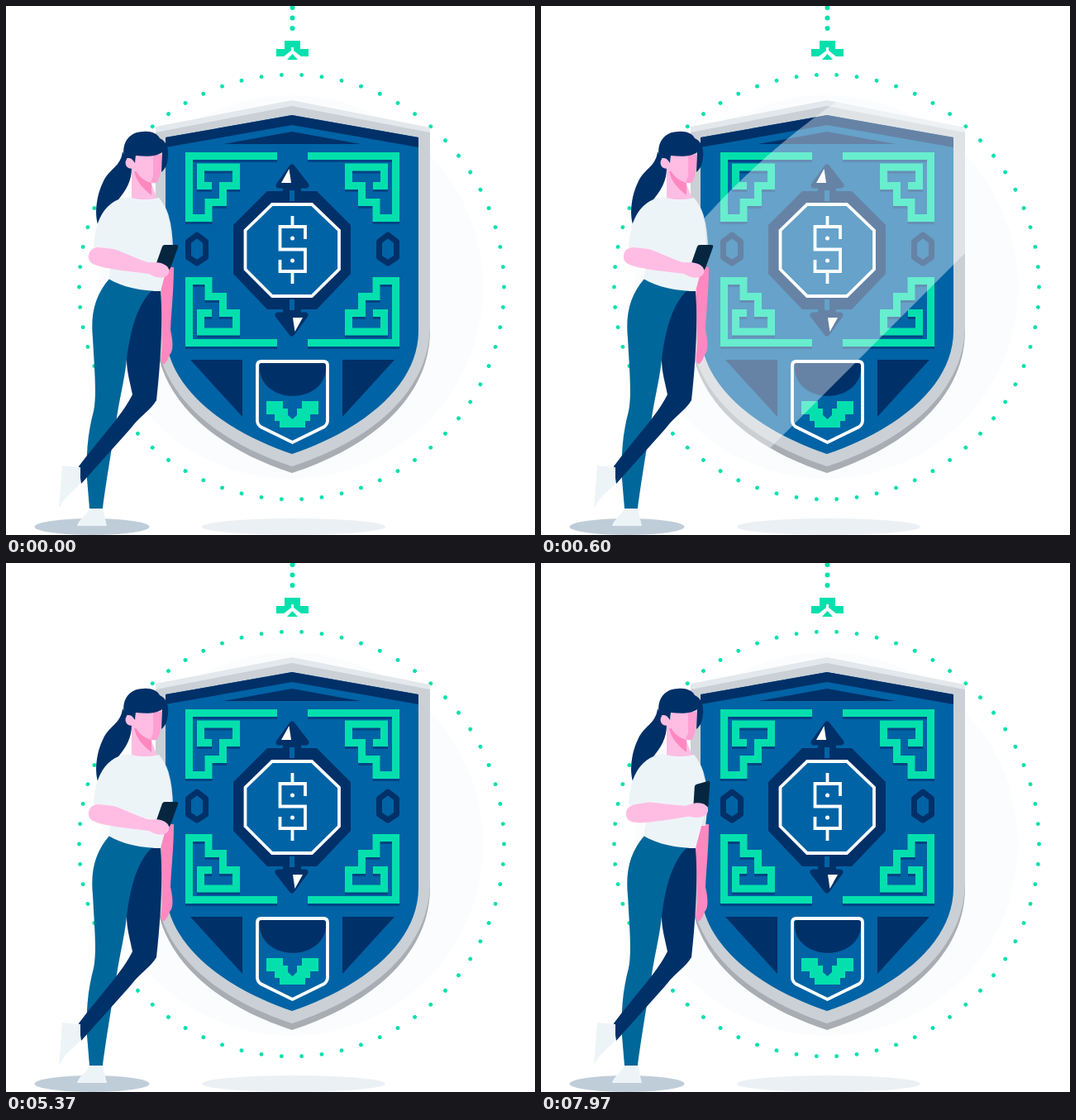
Animation, 640 px wide and 640 px high, one loop 8000 ms. Source, as an HTML page:

```html
<!DOCTYPE html>
<html lang="en">
<head>
<meta charset="utf-8">
<title>Shield</title>
<style>
  html, body { margin: 0; height: 100%; overflow: hidden; background: #fff; }
  svg { display: block; width: 100vw; height: 100vh; }
  .blue { fill: #0063a5; }
  .navy { fill: #003068; }
  .green { fill: #04e0ad; }
  .pale { fill: #edf4f8; }
  .pink { fill: #ffbde3; }
  .rose { fill: #ff88c1; }
  .line { fill: none; stroke: #fff; stroke-width: 3.8; }
</style>
</head>
<body>
<svg viewBox="0 0 640 640">
  <defs>
    <clipPath id="shield">
      <path d="M346 114L513 147V393C513 473 442 534 346 565C250 534 181 473 181 393V146Z"/>
    </clipPath>
    <path id="key" d="M328 181.5H221.5V256.5H245V237.500H262.500V217.500H278.500V195H235.500V217.500H249" fill="none" stroke-width="9"/>
    <g id="keys">
      <use href="#key"/>
      <use href="#key" transform="matrix(1 0 0 -1 0 589)"/>
    </g>
    <g id="side">
      <use href="#keys" y="3" stroke="#004584"/>
      <use href="#keys" stroke="#04e0ad"/>
      <path d="M231 277L241.5 285V304L231 311L220.5 304V285Z" class="blue" stroke="#003068" stroke-width="7" stroke-linejoin="round"/>
      <path d="M223 428H286V497Z" class="navy"/>
    </g>
    <g id="pointer">
      <path d="M346 195L363 217H330Z" class="navy" stroke="#003068" stroke-width="7" stroke-linejoin="round"/>
      <path d="M335 218H357V230H335Z" class="navy"/>
      <path d="M343 223H349V236H343Z" class="blue"/>
      <path d="M342.500 197L333 214H345Z" fill="#fff"/>
    </g>
  </defs>

  <circle cx="345" cy="340" r="232" fill="#fbfcfe"/>
  <circle cx="345.500" cy="340" r="257" fill="none" stroke="#04e0ad" stroke-width="4.800"
          stroke-linecap="round" pathLength="660" stroke-dasharray=".01 9.990"/>
  <g class="green">
    <circle cx="346.500" cy="2" r="3"/>
    <circle cx="346.500" cy="14.500" r="3"/>
    <circle cx="346.500" cy="27" r="3"/>
    <path d="M327 52H337V42H356V52H366V61H357L348 54V50H345V54L336 61H327ZM340 65L346.500 58L353 65Z"/>
  </g>
  <ellipse cx="104" cy="630" rx="69.500" ry="10" fill="#bfcdd9"/>
  <ellipse cx="348" cy="630" rx="111" ry="10" fill="#ebf0f4"/>

  <g clip-path="url(#shield)">
    <path d="M181 100H513V400H181Z" fill="#e3e8ec"/>
    <path d="M181 380H513V570H181Z" fill="#a9adb3"/>
    <path d="M346 121L513 153V386C513 466 442 526 346 557C250 526 181 466 181 386V153Z" fill="#cad0d5"/>
    <path d="M346 132L499 159V393C499 458 434 512 346 542C258 512 193 458 193 393V159Z" class="blue"/>
    <path d="M346 132L499 159V171L346 144L193 171V159ZM346 152L429 167H263Z" class="navy"/>

    <use href="#side"/>
    <use href="#side" transform="matrix(-1 0 0 1 693 0)"/>
    <path d="M316 224H376L417 265V324L376 367H316L275 324V265Z" class="navy"/>
    <use href="#pointer"/>
    <use href="#pointer" transform="rotate(180 346 295.500)"/>
    <path d="M322 240H370L403 271.500V318.500L370 351H322L289.500 318.500V271.500Z" class="line" style="fill:#0063a5"/>
    <path d="M362 282V267H331.500V294.500H362V321H331.500V307M346.500 254V267M346.500 321V336" class="line"/>
    <g fill="#fff"><circle cx="346.500" cy="281" r="2.500"/><circle cx="346.500" cy="308" r="2.500"/></g>

    <path d="M307 432H387V441C382 482 312 482 307 441Z" class="navy"/>
    <path d="M309 430H384Q389 430 389 435V501Q389 506 385 509L346.500 528L308 509Q304 506 304 501V435Q304 430 309 430Z" class="line"/>
    <path d="M315 478H335V487H341V495L346.500 500L352 495V487H358V478H378V494H368V502H362V510H331V502H325V494H315Z" class="green"/>

    <path id="glare" d="M957 50A920 920 0 0 0 59 948Z" fill="#fff" opacity=".4"/>
  </g>

  <g id="woman">
    <path d="M187 316H203C203 342 200 370 199 392C202 405 203 417 198 422C195 430 192 434 190 433C186 430 188 420 189 410Z" class="rose"/>
    <path d="M141 176C139 195 124 197 117 214C109 230 106 256 113 269L133 238C146 222 152 212 152 196Z" class="navy"/>

    <path d="M125 330C108 350 102 372 105 402C107 440 110 470 106 490C98 520 97 545 98 572L101 608H117C119 590 127 540 133 505C136 480 143 455 146 428L180 343Z" fill="#00679a"/>
    <path d="M176 345H187C190 380 187 432 182 477C175 489 164 494 150 512L91 578L88 557C110 527 141 495 153 470C150 455 146 442 146 428C150 395 158 362 176 345Z" class="navy"/>
    <path d="M68 556L90 558V577C83 587 74 589 64 608Z" class="pale"/>
    <path d="M101 608H117L122 629H86C88 621 96 618 101 608Z" class="pale"/>

    <path d="M152 195H176V215L183 234H152Z" class="pink"/>
    <path d="M155 200H176V229C165 220 158 213 155 200Z" class="rose"/>
    <path d="M185 232C198 246 201 268 202 292L199 318H180Z" fill="#e2ebf1"/>
    <path d="M148 231C164 236 176 234 185 232C198 249 200 270 199 300L187 345C165 345 140 340 124 330L130 299L106 292C107 260 120 234 148 231Z" class="pale"/>

    <path d="M157 178H188C189 192 187 207 183 213C178 216 170 213 163 207C158 202 157 199 156 196C148 199 143 193 145 187C148 182 153 184 157 188Z" class="pink"/>
    <path d="M178 180H188C189 192 187 207 183 213C180 215 177 214 175 213L178 206Z" fill="#ff9fd2"/>
    <path d="M144 186C138 168 148 152 166 152C175 151 183 154 186 160C195 164 197 174 196 183C195 193 192 198 188 201L189 177C180 183 169 182 157 181L156 190C152 183 147 183 144 186Z" class="navy"/>

    <g id="forearm">
      <path d="M192 289H206Q209 289 208 292L199 317Q198 320 195 319L184 315Q181 314 182 311L189 291Q190 289 192 289Z" fill="#06263f"/>
      <path d="M112 292C101 292 98 302 101 308C105 315 122 317 140 320L173 324C182 330 192 330 196 325C199 320 197 315 190 312C183 309 177 311 171 310C156 305 140 297 130 294Z" class="pink"/>
    </g>
  </g>
</svg>
<script>
  const LOOP = 8000, LIFT_START = 5.37;
  const glare = document.getElementById('glare');
  const forearm = document.getElementById('forearm');

  function draw(now) {
    const ms = now % LOOP;
    const sweep = -0.485 * (ms - 400);
    glare.setAttribute('transform', `translate(${sweep} ${sweep})`);

    // quick rise that settles slowly
    const lift = 1 - Math.exp(-Math.pow(Math.max(0, ms / 1000 - LIFT_START), 2.4));
    forearm.setAttribute('transform', `translate(${3 * lift} 0) rotate(${-15.8 * lift} 112 303)`);
    requestAnimationFrame(() => draw(performance.now()));
  }
  draw(performance.now());
</script>
</body>
</html>
```
